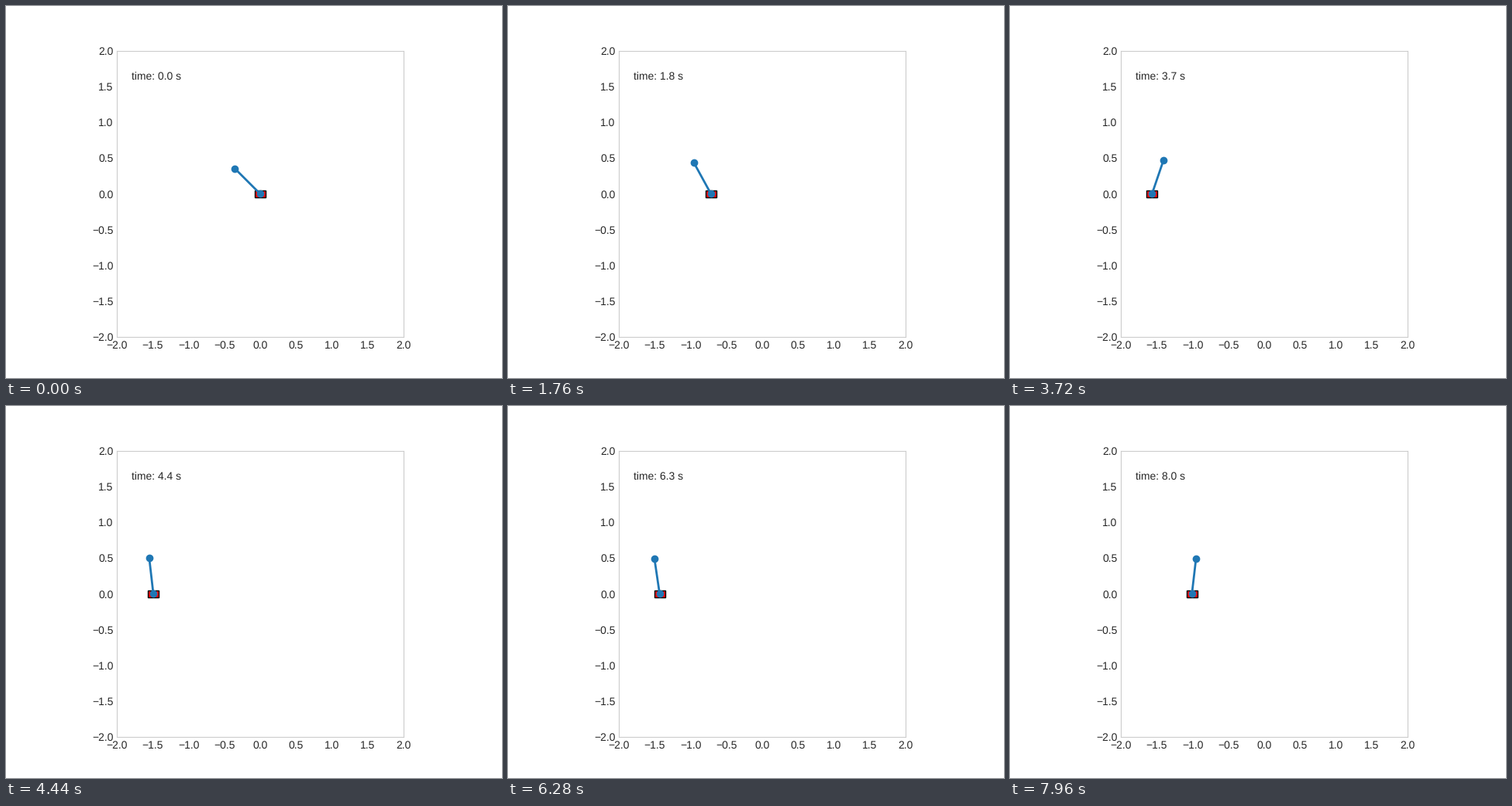
Recreate the animation shown at these times as a matplotlib script. Size 640 by 480 pixels, loop 8 s.

```python
import numpy as np
import matplotlib.pyplot as plt
from matplotlib.animation import FuncAnimation
from matplotlib.patches import Rectangle

FRAMES, STEP = 200, 40
LENGTH = 0.5
CART_W, CART_H = 0.15, 0.1
START_LEAN = 0.3575
DECAY = 6.0       # seconds for the sway to shrink by a factor e
RIPPLE = 0.09     # how far the tip gives way to the sway
TURN, FAR_LEFT = 5.4, -1.808

plt.rcParams.update({
    "font.family": "Liberation Sans",
    "font.size": 10,
    "text.hinting": "none",
    "text.color": "0.15",
    "xtick.color": "0.15",
    "ytick.color": "0.15",
    "axes.edgecolor": "0.8",
    "axes.linewidth": 0.8,
    "xtick.major.size": 0,
    "ytick.major.size": 0,
    "lines.solid_capstyle": "round",
})


def drift(t):
    """Slow travel: a quick first push, then left until TURN, then back."""
    gap = abs(t - TURN)
    travel = 0.263 * gap ** 0.89 if t < TURN else 0.3366 * gap
    return FAR_LEFT + travel + 0.2424 * np.exp(-5 * t)


def sway(t):
    """Decaying swing of the tip, speeding up as it gets smaller."""
    rate = 14.105 + 1.2 / (1 + np.exp(-1.65 * (t - 4.96)))
    return -START_LEAN * np.exp(-t / DECAY) * np.cos(rate * t - 0.15)


def pose(t):
    lean = sway(t)
    base = drift(t) - (1 + RIPPLE) * lean
    return base, base + lean, np.sqrt(LENGTH ** 2 - lean ** 2)


fig = plt.figure(figsize=(6.4, 4.8), dpi=100, facecolor="white")
ax = fig.add_subplot(xlim=(-2, 2), ylim=(-2, 2), aspect="equal")
ax.set_xticks(np.arange(-2, 2.1, 0.5))
ax.set_yticks(np.arange(-2, 2.1, 0.5))

clock = ax.text(0.05, 0.9, "", transform=ax.transAxes)
cart = ax.add_patch(Rectangle((0, -CART_H / 2), CART_W, CART_H,
                              facecolor="red", edgecolor="black"))
rod, = ax.plot([], [], color="#1f77b4", lw=2, marker="o", markersize=6)


def update(frame):
    t = frame * STEP / 1000
    x, tip_x, tip_y = pose(t)
    cart.set_x(x - CART_W / 2)
    rod.set_data([x, tip_x], [0, tip_y])
    clock.set_text(f"time: {t:.1f} s")
    return cart, rod, clock


anim = FuncAnimation(fig, update, frames=FRAMES, interval=STEP,
                     repeat=True, repeat_delay=0)
plt.show()
```
